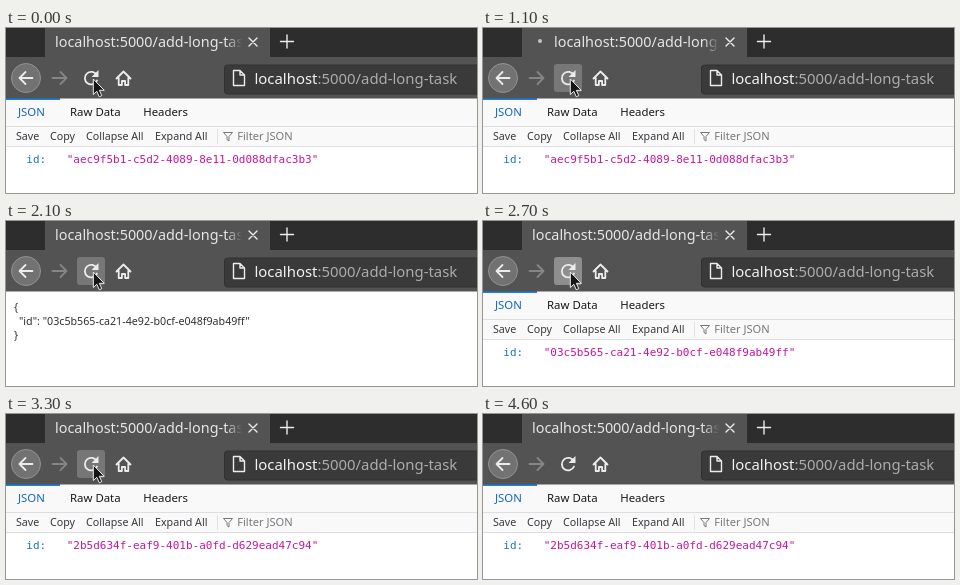
An HTML page that plays this animation: 471x165 px, repeating every 4800 ms.

```html
<!DOCTYPE html>
<html lang="en">
<head>
<meta charset="utf-8">
<title>Reloading a JSON page</title>
<style>
  html, body { margin: 0; width: 100%; height: 100%; overflow: hidden; background: #fff; }
  svg { display: block; width: 471px; height: 165px; }
  text { font-family: "Noto Sans", "Open Sans", sans-serif; white-space: pre; }
  .title { font-size: 14.4px; fill: #e6e6e6; }
  .url { font-size: 14.9px; fill: #acacac; }
  .host { fill: #f2f2f2; }
  .tabs text { font-size: 11.4px; fill: #18181a; }
  .tabs .on { fill: #1466c4; }
  .tools text { font-size: 10.7px; fill: #38383d; }
  .tools .hint { font-size: 11.1px; fill: #78787c; }
  .mono text { font-family: "DejaVu Sans Mono", monospace; font-size: 11px; }
  .raw text { font-size: 10.7px; fill: #303030; }
  .icon { fill: none; stroke: #ececec; stroke-width: 1.8; stroke-linecap: round; stroke-linejoin: round; }
  .thin { stroke-width: 1.4; }
  .dim { stroke: #868686; }
</style>
</head>
<body>
<svg viewBox="0 0 471 165">
  <defs>
    <clipPath id="titleClip"><rect x="45" y="0" width="191" height="29"/></clipPath>
    <linearGradient id="fade">
      <stop offset="0" stop-color="#535353" stop-opacity="0"/>
      <stop offset="1" stop-color="#535353"/>
    </linearGradient>
  </defs>
  <rect width="471" height="165" fill="#fff"/>

  <!-- JSON viewer -->
  <g id="viewer">
    <rect y="70" width="471" height="48" fill="#f9f9fa"/>
    <path d="M0 98.5H471M0 118.5H471" stroke="#dedee1"/>
    <rect y="70" width="54" height="2" fill="#1a7fe0"/>
    <g class="tabs">
      <text class="on" x="12" y="88">JSON</text>
      <text x="64" y="88">Raw Data</text>
      <text x="137.2" y="88">Headers</text>
    </g>
    <g class="tools">
      <text x="10" y="112">Save</text>
      <text x="44" y="112">Copy</text>
      <text x="80" y="112">Collapse All</text>
      <text x="149" y="112">Expand All</text>
      <path d="M211.5 101v15" stroke="#e2e2e5"/>
      <path d="M217.5 104.5h9l-3.5 4v4.5l-2-1.5v-3z" fill="none" stroke="#78787c"/>
      <text class="hint" x="231.2" y="112">Filter JSON</text>
    </g>
    <g class="mono">
      <text x="20.3" y="135" fill="#1673c2">id:</text>
      <text id="value" x="60.7" y="135" fill="#c8149c"></text>
    </g>
  </g>

  <!-- unformatted response -->
  <g id="raw" class="raw">
    <text x="8" y="90">{</text>
    <text id="rawLine" x="13" y="104"></text>
    <text x="8" y="118">}</text>
  </g>

  <!-- tab strip -->
  <rect width="471" height="29" fill="#2d2d2e"/>
  <rect x="39" width="225" height="29" fill="#535353"/>
  <g clip-path="url(#titleClip)">
    <text id="title" class="title" x="49" y="19">localhost:5000/add-long-task</text>
    <rect x="220" width="16" height="29" fill="url(#fade)"/>
  </g>
  <circle id="dot" cy="13" r="2" fill="#c4c4c6"/>
  <path class="icon thin" d="M243 10l8 8M251 10l-8 8"/>
  <path class="icon thin" d="M274.5 13.5h13M281 7v13"/>

  <!-- navigation bar -->
  <rect y="29" width="471" height="41.5" fill="#535353"/>
  <circle cx="20" cy="50" r="14.5" fill="#727272" stroke="#929292"/>
  <path class="icon" d="M26.5 50H14M19.5 44l-6 6 6 6"/>
  <path class="icon dim" d="M46.5 50H60M54.5 44l6 6-6 6"/>
  <rect id="hover" x="71" y="36" width="28" height="28" rx="3"/>
  <path class="icon" d="M90.8 47.3A6.3 6.3 0 1 0 91 52.5"/>
  <path d="M92.5 42v7h-7z" fill="#ececec"/>
  <path class="icon" d="M110.5 50.5l7-7 7 7M112.7 50v7h3.2v-4h3.2v4h3.2v-7"/>
  <rect x="218.5" y="37" width="260" height="29" rx="3" fill="#3a3a3b" stroke="#303031"/>
  <path class="icon thin" d="M227.5 42.5h6.5l4.5 4.5v10.5h-11zM234 42.5v4.5h4.500"/>
  <text class="url" x="248.5" y="56"><tspan class="host">localhost</tspan>:5000/add-long-task</text>

  <path id="cursor" d="M87.3 51V66.5l3.5-3.200 2.500 5.500 2.500-1.200-2.500-5.300h4.900z"
        fill="#161616" stroke="#ececec" stroke-linejoin="round"/>
</svg>
<script>
  const LOOP = 4800;
  const STEP = 100;
  const DOT_PATH = [51, 57, 62, 57, 51];
  const FIRST_ID = "aec9f5b1-c5d2-4089-8e11-0d088dfac3b3";
  // Each reload: click, raw response, formatted response (ms).
  const reloads = [
    { click: 1000, raw: 1300, done: 1400, id: "2ee9701f-6159-4ddc-8430-1681d12a5fed" },
    { click: 1600, raw: 2100, done: 2200, id: "03c5b565-ca21-4e92-b0cf-e048f9ab49ff" },
    { click: 2900, raw: 3200, done: 3300, id: "2b5d634f-eaf9-401b-a0fd-d629ead47c94" }
  ];
  // Reload button background from each time on (ms).
  const REST = "#535353", HOVER = "#777777", PRESSED = "#8e8e8e";
  const buttonSteps = [
    [0, REST], [200, HOVER], [700, PRESSED], [1000, HOVER],
    [2700, PRESSED], [2900, HOVER], [4100, "#656565"], [4200, REST]
  ];

  const el = id => document.getElementById(id);
  const [title, dot, hover, viewer, value, raw, rawLine, cursor] =
    ["title", "dot", "hover", "viewer", "value", "raw", "rawLine", "cursor"].map(el);
  const show = (node, on) => node.setAttribute("visibility", on ? "visible" : "hidden");

  function draw(t) {
    const loading = reloads.find(r => t >= r.click && t < r.raw);
    const plain = reloads.find(r => t >= r.raw && t < r.done);
    const id = reloads.reduce((last, r) => t >= r.raw ? r.id : last, FIRST_ID);

    title.setAttribute("x", loading ? 71 : 49);
    show(dot, loading);
    if (loading) {
      const step = Math.floor((t - loading.click) / STEP);
      dot.setAttribute("cx", DOT_PATH[step % DOT_PATH.length]);
    }
    show(viewer, !plain);
    show(raw, plain);
    value.textContent = `"${id}"`;
    rawLine.textContent = `"id": "${id}"`;
    hover.setAttribute("fill", buttonSteps.filter(([from]) => t >= from).pop()[1]);
    show(cursor, t < 4100);
  }

  const start = performance.now();
  function tick() {
    draw((performance.now() - start) % LOOP);
    requestAnimationFrame(tick);
  }
  tick();
</script>
</body>
</html>
```
